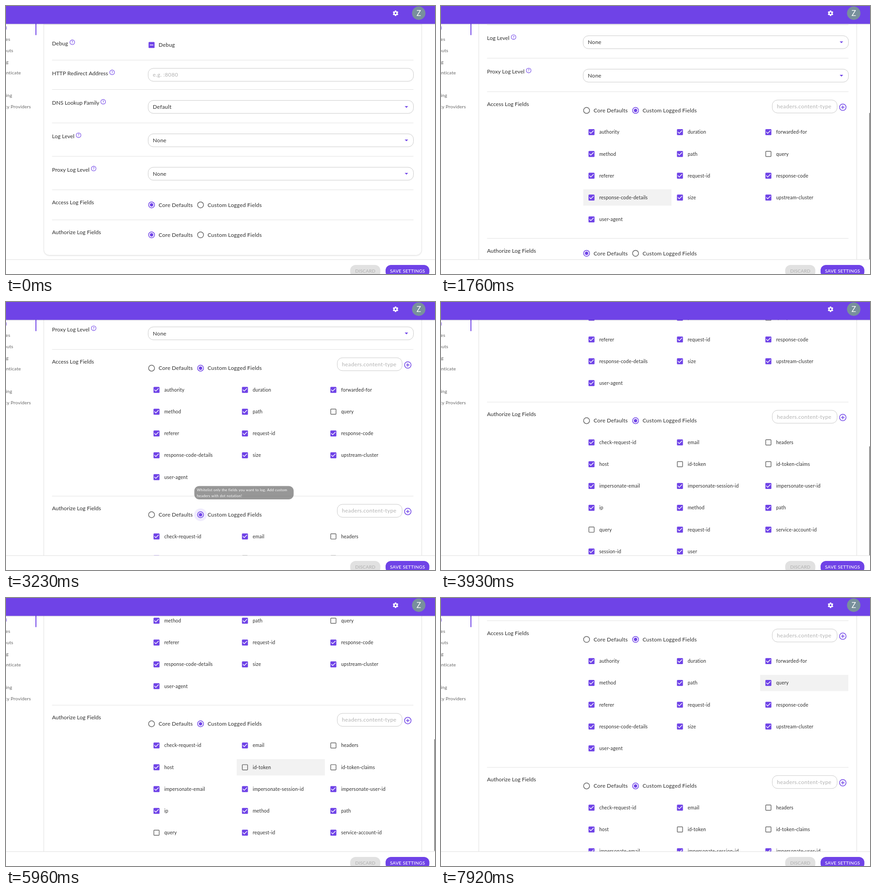
Write an HTML page with a canvas that moves like this. It is 946 px wide and 592 px high and loops after 7.99 s.

```html
<!DOCTYPE html>
<html lang="en">
<head>
<meta charset="utf-8">
<title>Log field settings</title>
<style>
html, body { margin: 0; width: 946px; height: 592px; overflow: hidden; background: #fff; }
canvas { display: block; }
</style>
</head>
<body>
<canvas id="stage" width="946" height="592"></canvas>
<script>
const ctx = document.getElementById('stage').getContext('2d');
const W = 946, H = 592, LOOP = 7990;
const PURPLE = '#6f43e7', INK = '#2c2c2c', GRAY = '#666', LINE = '#e1e1e1', HINT = '#b2b2b2';
const FAMILY = 'Lato, "Open Sans", sans-serif';

const ACCESS = ['authority', 'duration', 'forwarded-for', 'method', 'path', 'query', 'referer',
  'request-id', 'response-code', 'response-code-details', 'size', 'upstream-cluster', 'user-agent'];
const AUTHORIZE = ['check-request-id', 'email', 'headers', 'host', 'id-token', 'id-token-claims',
  'impersonate-email', 'impersonate-session-id', 'impersonate-user-id', 'ip', 'method', 'path',
  'query', 'request-id', 'service-account-id', 'session-id', 'user'];
const UNCHECKED = ['headers', 'id-token', 'id-token-claims', 'query'];
const MENU = [['General', 2.5, 48], ['Cookies', 9.5, 73], ['Timeouts', 16, 98], ['Logging', 5.5, 123],
  ['Authenticate', 33, 147.7], ['Tracing', 13.5, 197.5], ['Identity Providers', 55, 222.3]];

// time, scroll offset
const SCROLL = [[0, 0], [1200, 0], [1760, 216.4], [2110, 301.2], [3440, 301.2], [3930, 508.9],
  [5820, 508.9], [5960, 493.4], [6520, 399.7], [6870, 355.9], [LOOP, 355.9]];
// time, pointer x, pointer y
const POINTER = [[0, 429, 437], [2460, 429, 475], [4910, 560, 365], [7430, 722, 187]];
// scroll bar: shown from, fading from
const BAR = [[1270, 2670], [3510, 4560], [5890, 7430]];
const OPEN_ACCESS = 850, OPEN_AUTHORIZE = 3080, CHECK_QUERY = 7640;
const ROW = 48.18, ROW_H = 36.4, COL = 195;

const clamp = v => Math.max(0, Math.min(1, v));
const ramp = (t, from, ms) => clamp((t - from) / ms);

function slope(i) {
  if (i < 1 || i > SCROLL.length - 2) return 0;
  const d = k => (SCROLL[k + 1][1] - SCROLL[k][1]) / (SCROLL[k + 1][0] - SCROLL[k][0]);
  const a = d(i - 1), b = d(i);
  return a * b <= 0 ? 0 : 2 * a * b / (a + b);
}

function scrollAt(t) {
  let i = 0;
  while (i < SCROLL.length - 2 && t >= SCROLL[i + 1][0]) i++;
  const [t0, y0] = SCROLL[i], [t1, y1] = SCROLL[i + 1];
  const h = t1 - t0, u = (t - t0) / h, v = 1 - u;
  return y0 * (1 + 2 * u) * v * v + slope(i) * h * u * v * v
    + y1 * u * u * (3 - 2 * u) - slope(i + 1) * h * u * u * v;
}

function text(s, x, y, { size = 12, color = INK, gap = 0.2, align = 'left', weight = 400 } = {}) {
  ctx.font = `${weight} ${size}px ${FAMILY}`;
  ctx.letterSpacing = gap + 'px';
  ctx.textAlign = align;
  ctx.fillStyle = color;
  ctx.fillText(s, x, y + size * 0.355);
}

function box(x, y, w, h, r, fill, stroke, lw = 1) {
  ctx.beginPath();
  ctx.roundRect(x, y, w, h, r);
  if (fill) { ctx.fillStyle = fill; ctx.fill(); }
  if (stroke) { ctx.strokeStyle = stroke; ctx.lineWidth = lw; ctx.stroke(); }
}

function circle(x, y, r, fill, stroke, lw = 1.5) {
  ctx.beginPath();
  ctx.arc(x, y, r, 0, 7);
  if (fill) { ctx.fillStyle = fill; ctx.fill(); }
  if (stroke) { ctx.strokeStyle = stroke; ctx.lineWidth = lw; ctx.stroke(); }
}

function path(points, color, lw) {
  ctx.beginPath();
  points.forEach(p => ctx.lineTo(p[0], p[1]));
  ctx.strokeStyle = color;
  ctx.lineWidth = lw;
  ctx.stroke();
}

function divider(y, x = 101.5) {
  ctx.fillStyle = LINE;
  ctx.fillRect(x, y - 0.5, 2 * (500 - x), 1);
}

function label(s, y, helpX) {
  text(s, 101.5, y, { gap: 0.05 });
  if (!helpX) return;
  circle(helpX, y - 2.4, 5.2, null, PURPLE, 1.1);
  text('?', helpX, y - 2.3, { size: 8, color: PURPLE, gap: 0, align: 'center', weight: 700 });
}

function field(x, y, w, value, color = INK) {
  box(x, y - 14.3, w, 28.6, 11.5, '#fff', '#cacaca');
  text(value, x + 10.3, y, { color, gap: color === HINT ? 0.36 : 0.28 });
}

function select(y, value) {
  field(313.5, y, 585, value);
  ctx.beginPath();
  ctx.moveTo(879.2, y - 1.7);
  ctx.lineTo(886.8, y - 1.7);
  ctx.lineTo(883, y + 2.1);
  ctx.fillStyle = PURPLE;
  ctx.fill();
}

function checkbox(x, y, on) {
  if (!on) return box(x - 5.8, y - 5.8, 11.6, 11.6, 1, null, GRAY, 1.45);
  box(x - 6.6, y - 6.6, 13.2, 13.2, 1.5, PURPLE);
  path([[x - 4.6, y - 0.4], [x - 1.5, y + 2.7], [x + 4.6, y - 3.4]], '#fff', 1.45);
}

function radio(x, y, on, s) {
  circle(x, y, 6.6, null, on ? PURPLE : GRAY);
  if (on) circle(x, y, 3.7, PURPLE);
  text(s, x + 15.5, y);
}

// Expanding disc that fades over the second half of its life
function ripple(t, start, ms, x, y, r, rgb, alpha) {
  const u = (t - start) / ms;
  if (u <= 0 || u >= 1) return;
  const grow = Math.sin(clamp(u * 2) * Math.PI / 2);
  circle(x, y, r * grow, `rgba(${rgb},${alpha * clamp(2.1 - 2 * u)})`);
}

function row(t, name, x, y, on, mouse) {
  const [since, mx, my] = mouse;
  if (mx > x && mx < x + COL && Math.abs(my - y) < ROW_H / 2) {
    ctx.save();
    ctx.beginPath();
    ctx.rect(x, y - ROW_H / 2, COL, ROW_H);
    ctx.clip();
    ctx.fillStyle = `rgba(0,0,0,${0.05 * ramp(t, since - 40, 150)})`;
    ctx.fill();
    ripple(t, 4980, 770, mx, my, 130, '0,0,0', 0.04);
    ripple(t, 7570, 350, mx, my, 180, '0,0,0', 0.06);
    ctx.restore();
  }
  checkbox(x + 18.4, y, on);
  text(name, x + 35.4, y, { size: 10.6, gap: 0.22 });
}

// Draws one log section: heading, choice, and the field list once opened
function section(t, title, y, names, clickAt, isOn, mouse) {
  const open = t >= clickAt;
  const ry = y + (open ? 14.1 : 6);
  label(title, y);
  ripple(t, clickAt - 70, 430, 429, ry, 14, '111,67,231', 0.1);
  radio(321, ry, !open, 'Core Defaults');
  radio(429, ry, open, 'Custom Logged Fields');
  if (!open) return;
  field(730.5, y + 5.4, 143, 'headers.content-type', HINT);
  circle(886, y + 7, 7.2, null, PURPLE);
  path([[882.2, y + 7], [889.8, y + 7]], PURPLE, 1.5);
  path([[886, y + 3.2], [886, y + 10.8]], PURPLE, 1.5);
  names.forEach((n, i) =>
    row(t, n, 313.5 + COL * (i % 3), y + 62 + ROW * Math.floor(i / 3), isOn(n), mouse));
}

function tooltip(y, alpha) {
  if (alpha <= 0) return;
  ctx.globalAlpha = alpha;
  box(415.3, y, 219, 29.6, 11, 'rgba(107,107,107,.7)');
  const style = { size: 8, color: '#fff', gap: 0.25 };
  text('Whitelist only the fields you want to log. Add custom', 421, y + 9, style);
  text('headers with dot notation!', 421, y + 21.4, style);
  ctx.globalAlpha = 1;
}

function content(t, s) {
  const mouse = POINTER.filter(p => t >= p[0]).pop();
  const y = v => v - s;
  const accessH = t >= OPEN_ACCESS ? 323.7 : 66.2;
  const authH = t >= OPEN_AUTHORIZE ? 371.9 : 66.2;
  const bottom = y(433.3 + accessH + authH - 15.2);
  ctx.save();
  ctx.shadowColor = 'rgba(0,0,0,.12)';
  ctx.shadowBlur = 3;
  ctx.shadowOffsetY = 1;
  box(83.5, -60, 833, bottom + 60, 12, '#fff');
  ctx.restore();
  box(83.5, -60, 833, bottom + 60, 12, '#fff', '#e6e6e6');

  divider(y(41), 84);
  [119.5, 184.5, 258.3, 332, 406].forEach(v => divider(y(v)));
  label('Debug', y(82.5), 146.2);
  label('HTTP Redirect Address', y(149), 234);
  label('DNS Lookup Family', y(214), 214.3);
  label('Log Level', y(287.8), 160);
  label('Proxy Log Level', y(361.5), 193.3);

  box(314.4, y(79.6), 13.2, 13.2, 1.5, PURPLE);
  ctx.fillStyle = '#fff';
  ctx.fillRect(317.2, y(85.4), 7.6, 1.5);
  text('Debug', 336.5, y(86.2));
  field(313.5, y(152), 585, 'e.g. :8080', HINT);
  select(y(222.9), 'Default');
  select(y(296.7), 'None');
  select(y(370.5), 'None');

  const ay = 433.3;
  section(t, 'Access Log Fields', y(ay), ACCESS, OPEN_ACCESS,
    n => n !== 'query' || t >= CHECK_QUERY, mouse);
  divider(y(ay + accessH - 27));
  section(t, 'Authorize Log Fields', y(ay + accessH), AUTHORIZE, OPEN_AUTHORIZE,
    n => !UNCHECKED.includes(n), mouse);

  tooltip(y(384.3), ramp(t, 440, 200) - ramp(t, 1300, 200));
  tooltip(y(707.6), ramp(t, 2610, 200) - ramp(t, 3480, 200));
}

function scrollBar(t, s) {
  const span = BAR.find(b => t >= b[0] && t < b[1] + 210);
  if (!span) return;
  const ratio = t >= OPEN_AUTHORIZE ? 0.443 : 0.585;
  ctx.fillStyle = `rgba(0,0,0,${0.55 * (1 - ramp(t, span[1] - 70, 210))})`;
  ctx.fillRect(944.5, 43.4 + ratio * (s + 113), 1.5, 557 * ratio);
}

function gear(x, y) {
  ctx.fillStyle = '#fff';
  for (let i = 0; i < 6; i++) {
    ctx.save();
    ctx.translate(x, y);
    ctx.rotate(i * Math.PI / 3);
    ctx.fillRect(-1.6, -6.1, 3.2, 4);
    ctx.restore();
  }
  circle(x, y, 4.6, '#fff');
  circle(x, y, 2.1, PURPLE);
}

function button(x, w, name, fill, color, gap) {
  box(x, 572, w, 27, 12, fill);
  text(name, x + w / 2, 585.7, { size: 10.2, color, gap, align: 'center', weight: 500 });
}

function frame() {
  ctx.fillStyle = '#fff';
  ctx.fillRect(0, 0, W, H);
  const t = performance.now() % LOOP, s = scrollAt(t);

  content(t, s);
  scrollBar(t, s);

  MENU.forEach(([name, right, y], i) =>
    text(name, right, y, { size: 10.4, align: 'right', color: i ? GRAY : PURPLE }));
  ctx.fillStyle = PURPLE;
  ctx.fillRect(65, 39, 2, 25.3);

  ctx.save();
  ctx.shadowColor = 'rgba(0,0,0,.22)';
  ctx.shadowBlur = 2;
  ctx.fillStyle = PURPLE;
  ctx.fillRect(-5, -5, W + 10, 44.5);
  ctx.restore();
  gear(859, 16);
  circle(910.1, 15.9, 14.8, '#78909c');
  text('Z', 910.1, 16.2, { size: 16.5, color: '#fff', gap: 0, align: 'center' });

  ctx.fillStyle = '#fff';
  ctx.fillRect(0, 560, W, 32);
  ctx.fillStyle = '#dedede';
  ctx.fillRect(0, 559.6, W, 1);
  button(759, 66.5, 'DISCARD', '#e1e1e1', '#b3b3b3', 0.05);
  button(837, 96.6, 'SAVE SETTINGS', PURPLE, '#fff', 0.22);

  requestAnimationFrame(frame);
}
requestAnimationFrame(frame);
</script>
</body>
</html>
```
